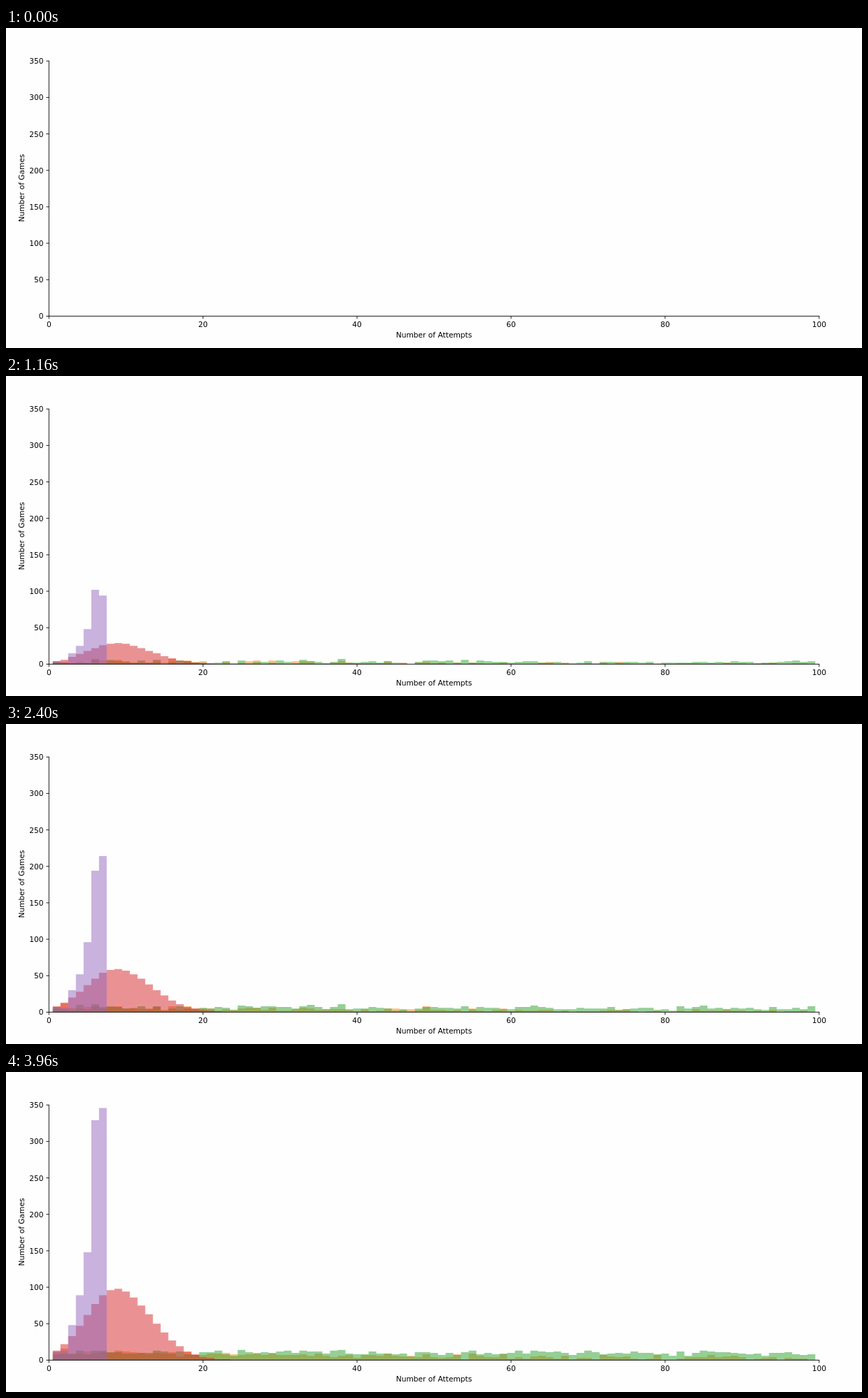
Write an HTML page with a canvas that moves like this. It is 1222 by 458 pixels and loops after 4 s.

```html
<!DOCTYPE html>
<html lang="en">
<head>
<meta charset="utf-8">
<title>Attempts histogram</title>
<style>
  html, body { margin: 0; width: 1222px; height: 458px; overflow: hidden; background: #fefefe; }
  canvas, svg { position: absolute; left: 0; top: 0; display: block; }
  text { font: 10.65px "DejaVu Sans", sans-serif; }
  line { stroke: #000; stroke-width: 0.9; }
</style>
</head>
<body>
<canvas id="bars" width="1222" height="458"></canvas>
<svg id="axes" width="1222" height="458" viewBox="0 0 1222 458"></svg>
<script>
const LOOP = 4000, STEP = 40, LAST = 99, BINS = 99;
const px = attempts => 61.3 + attempts * 10.995;
const py = games => 412.4 - games * 1.0434;

// --- axes ---
const axes = document.getElementById('axes');
function add(tag, attrs, label = '') {
  const el = document.createElementNS('http://www.w3.org/2000/svg', tag);
  for (const key in attrs) el.setAttribute(key, attrs[key]);
  el.textContent = label;
  axes.append(el);
}
const line = (x1, y1, x2, y2) => add('line', { x1, y1, x2, y2 });
const text = (x, y, anchor, label, angle = 0) => add('text', {
  transform: `translate(${x} ${y}) rotate(${angle})`, 'text-anchor': anchor
}, label);

line(px(0), py(350) - 0.4, px(0), py(0) + 0.4);
line(px(0) - 0.4, py(0), px(100) + 0.4, py(0));
for (let v = 0; v <= 100; v += 20) {
  line(px(v), py(0), px(v), py(0) + 3.9);
  text(px(v), 428.4, 'middle', v);
}
for (let v = 0; v <= 350; v += 50) {
  line(px(0) - 3.9, py(v), px(0), py(v));
  text(53.6, py(v) + 4, 'end', v);
}
text(611, 443, 'middle', 'Number of Attempts');
text(26, 229, 'middle', 'Number of Games', -90);

// --- series: games finished in a bin after n steps ---
let seed = 7;
function random() {
  seed = (seed * 16807) % 2147483647;
  return seed / 2147483647;
}

// Games that finish at random steps, around a mean total per bin
function scattered(mean, spread) {
  const ends = Array.from({ length: BINS + 1 }, (_, bin) => {
    const total = Math.round(mean(bin) + spread * (random() + random() - 1));
    return Array.from({ length: Math.max(0, total) }, () => random() * LAST);
  });
  return (bin, n) => ends[bin].filter(t => t < n).length;
}

// Lopsided bell that grows evenly
function bell(peak, center, left, right) {
  return (bin, n) => {
    const d = (bin - center) / (bin < center ? left : right);
    return Math.round(peak * Math.exp(-d * d / 2) * n / LAST);
  };
}

// Straight lines through key rows of [step, ...counts]
function through(rows) {
  return (bin, n) => {
    const i = Math.max(1, rows.findIndex(row => row[0] >= n));
    const a = rows[i - 1], b = rows[i];
    const from = a[bin] || 0, to = b[bin] || 0;
    return Math.round(from + (to - from) * (n - a[0]) / (b[0] - a[0]));
  };
}

const series = [
  ['#ff7f0e', scattered(bin => 3 + 9 * Math.exp(-bin / 38), 5)],
  ['#2ca02c', scattered(() => 9.9, 5)],
  ['#d62728', bell(98, 8.7, 3.85, 4.55)],
  ['#9467bd', through([
    [0],
    [18, 2, 1, 10, 16, 31, 70, 51],
    [60, 7, 6, 30, 52, 96, 194, 214],
    [LAST, 11, 13, 48, 89, 148, 329, 346]
  ])]
];

// --- drawing ---
const ctx = document.getElementById('bars').getContext('2d');
ctx.globalAlpha = 0.5;

function draw(n) {
  ctx.clearRect(0, 0, 1222, 458);
  for (const [color, count] of series) {
    ctx.fillStyle = color;
    ctx.beginPath();
    ctx.moveTo(px(0.5), py(0));
    for (let bin = 1; bin <= BINS; bin++) {
      const y = py(count(bin, n));
      ctx.lineTo(px(bin - 0.5), y);
      ctx.lineTo(px(bin + 0.5), y);
    }
    ctx.lineTo(px(BINS + 0.5), py(0));
    ctx.fill();
  }
}

const start = performance.now();
let shown = -1;
function tick() {
  const n = Math.floor(((performance.now() - start) % LOOP) / STEP);
  if (n !== shown) draw(shown = n);
  requestAnimationFrame(tick);
}
tick();
</script>
</body>
</html>
```
